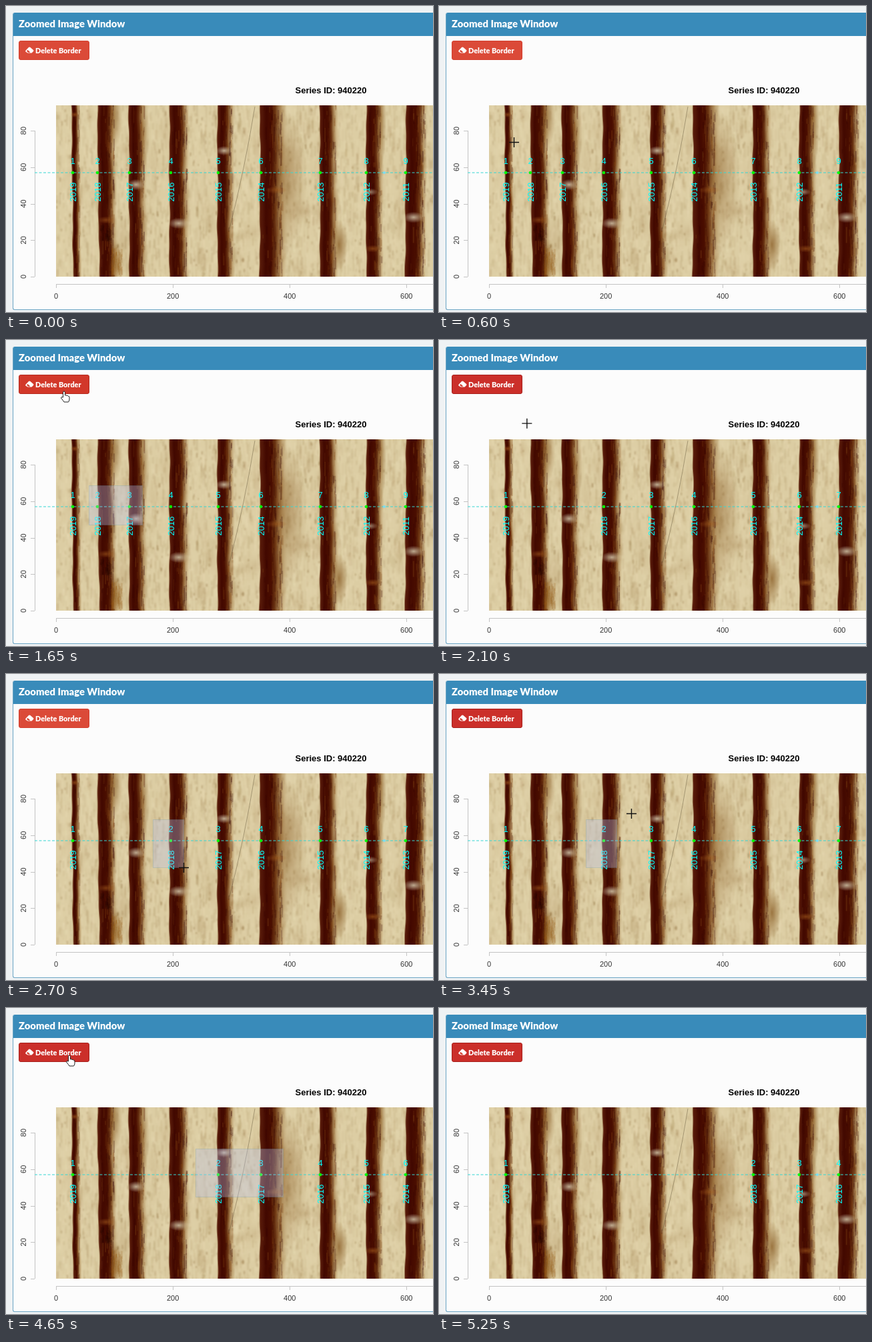
Animation, 640 px wide and 459 px high, one loop 5.4 s. Source, as an HTML page with a canvas:

```html
<!DOCTYPE html>
<html lang="en">
<head>
<meta charset="utf-8">
<title>Zoomed Image Window</title>
<style>
  html, body { margin: 0; width: 100%; height: 100%; overflow: hidden; background: #eff2f4; }
  .box, canvas, svg { position: absolute; }
  .box {
    left: 10px; top: 10px; width: 630px; height: 446px; box-sizing: border-box;
    border: solid #6ba5c4; border-width: 0 0 1px 1px; border-radius: 3px 0 0 3px;
    background: #fcfcfc; overflow: hidden;
    font-family: Lato, "Open Sans", sans-serif; font-weight: 900; color: #fff;
  }
  .head {
    position: absolute; left: -1px; top: 0; width: 630px; height: 35px;
    background: #398bba; font-size: 14.8px; line-height: 32px; text-indent: 9px;
  }
  .btn {
    position: absolute; left: 8px; top: 42px; width: 106px; height: 29px; box-sizing: border-box;
    border: 1px solid #d43f2e; border-radius: 3px; background: #db4a38;
    font-size: 10.8px; line-height: 27px; text-indent: 24px; white-space: nowrap;
  }
  .btn.hover { background: #d2382a; border-color: #b52a1e; }
  .btn.focus { background: #cb2f2a; border-color: #a8201c; }
  canvas { left: 75px; top: 149px; }
  svg { left: 0; top: 0; font-family: "Liberation Sans", Arial, sans-serif; }
  .mid { text-anchor: middle; }
</style>
</head>
<body>
<div class="box">
  <div class="head">Zoomed Image Window</div>
  <div class="btn" id="btn">Delete Border</div>
</div>
<canvas id="wood" width="565" height="257"></canvas>
<svg width="640" height="459" viewBox="0 0 640 459">
  <path d="M29.3 67 L34 62 Q35.2 61 36.4 62 L41 66 Q42 67 41 68 L38.5 70.6 H32.5 L29.3 68.4 Z" fill="#fff"/>
  <path d="M31 67.6 L32.6 66 L36.2 69.2 L35.6 69.7 H33 Z" fill="#d4402f"/>
  <text class="mid" x="487" y="131" font-size="13" font-weight="700">Series ID: 940220</text>
  <g id="axes" font-size="11" fill="#333"></g>
  <path d="M43 250H640" stroke="#35d6d2" stroke-dasharray="4 2.5"/>
  <circle cx="567" cy="250" r="2" fill="#7fdcf0"/>
  <g id="marks" font-size="13" fill="#0ff"></g>
  <rect id="brush" fill="#b8c2ee" stroke="#7aa4c4" opacity=".34"/>
  <path id="cross" d="M-7 .5H8M.5 -7V8" stroke="#111" stroke-width="1.4"/>
  <path id="hand" fill="#fff" stroke="#222" stroke-linejoin="round"
    d="M-1.5 8V0.5Q-1.5-1 0-1T1.5 .5V5Q3 4 4 5.5Q5.6 4.8 6.3 6.3Q8 6 8 8V11Q8 13 6.5 15H0Q-1.5 12.5-4.5 9Q-4.5 6.5-1.5 8Z"/>
</svg>
<script>
const $ = id => document.getElementById(id);
const STEP = 150, STEPS = 36;

function add(parent, tag, attrs, text = '') {
  const el = document.createElementNS('http://www.w3.org/2000/svg', tag);
  for (const key in attrs) el.setAttribute(key, attrs[key]);
  el.textContent = text;
  return parent.appendChild(el);
}

// Wood scan
function paintWood() {
  const wood = $('wood'), ctx = wood.getContext('2d'), W = wood.width, H = wood.height;
  let seed = 29;
  const rnd = () => (seed = (seed * 16807) % 2147483647) / 2147483647;
  const span = (a, b) => a + rnd() * (b - a);
  const streak = (x, y, w, h, rgb, alpha) => {
    ctx.fillStyle = `rgba(${rgb},${alpha})`;
    ctx.fillRect(x, y, w, h);
  };
  const blotch = (x, y, rx, ry, rgb, alpha) => {
    const g = ctx.createRadialGradient(0, 0, 0, 0, 0, 1);
    g.addColorStop(0, `rgba(${rgb},${alpha})`);
    g.addColorStop(1, `rgba(${rgb},0)`);
    ctx.save();
    ctx.translate(x, y);
    ctx.scale(rx, ry);
    ctx.fillStyle = g;
    ctx.fillRect(-1, -1, 2, 2);
    ctx.restore();
  };

  ctx.fillStyle = '#dccda3';
  ctx.fillRect(0, 0, W, H);
  for (let i = 0; i < 150; i++)
    blotch(rnd() * W, rnd() * H, span(6, 18), span(10, 40),
      rnd() < .5 ? '238,226,190' : '165,130,80', span(.08, .24));
  for (let i = 0; i < 5200; i++)
    streak(rnd() * W, span(-20, H), span(1, 3.2), span(4, 20),
      rnd() < .55 ? '240,228,192' : '152,122,72', span(.06, .2));
  for (let i = 0; i < 330; i++)
    streak(rnd() * W, rnd() * H, span(1, 2.4), span(2, 7), '125,90,40', span(.2, .45));
  ctx.filter = 'blur(.8px)';
  ctx.drawImage(wood, 0, 0);
  ctx.filter = 'none';

  // stained patches beside the bands
  [[342, 115, 34, 110, .5], [424, 209, 13, 38, .75], [85, 18, 14, 50, .75],
   [88, 236, 14, 36, .6], [486, 25, 9, 70, .7], [130, 40, 10, 60, .5]]
    .forEach(([x, y, rx, ry, alpha]) => blotch(x, y, rx, ry, '134,88,32', alpha));

  // left edge, dark width, soft width, lean towards the bottom
  const bands = [
    [23, 8, 4, 3], [62, 19, 8, 3], [109, 17, 9, 1], [170, 20, 9, 0], [242, 16, 9, 0],
    [306, 24, 16, -1], [395, 18, 9, 1], [465, 17, 8, 0], [525, 22, 9, -2]
  ];
  bands.forEach(([x, dark, soft, lean], k) => {
    const w = dark + soft + 2;
    const g = ctx.createLinearGradient(0, 0, w, 0);
    [[0, '98,48,14,0'], [2 / w, '82,18,2,.95'], [.25, '66,8,0,1'], [dark * .75 / w, '74,14,0,1'],
     [dark / w, '98,42,10,.95'], [(dark + soft / 2) / w, '142,94,42,.6'], [1, '190,156,100,0']]
      .forEach(([at, c]) => g.addColorStop(at, `rgba(${c})`));
    ctx.fillStyle = g;
    for (let y = 0; y < H; y++) {
      const wave = Math.sin(y / 19 + k * 2) * .6 + Math.sin(y / 7 + k) * .35;
      ctx.setTransform(1, 0, 0, 1, x - 1 + lean * y / H + wave, y);
      ctx.fillRect(0, 0, w, 1);
    }
    ctx.setTransform(1, 0, 0, 1, 0, 0);
    for (let i = 0; i < dark * 7; i++) {
      const at = Math.sqrt(rnd());
      streak(x + 2 + at * (dark + soft * .4), span(-8, H), span(1, 2.4), span(5, 24),
        rnd() < .45 ? '132,72,22' : '52,4,0', span(.1, .32));
    }
  });

  // crossing marks: centre, width, height, colour, strength
  const pale = '218,208,178', rust = '165,92,28';
  [[120, 119, 21, 12, pale, .8], [184, 177, 25, 12, pale, .8], [252, 68, 20, 10, pale, .8],
   [470, 130, 20, 8, pale, .6], [536, 168, 25, 12, pale, .8], [28, 14, 10, 6, rust, .6],
   [75, 172, 21, 8, rust, .55], [330, 127, 27, 8, rust, .5], [475, 215, 20, 8, rust, .6]
  ].forEach(([x, y, w, h, rgb, strength]) => blotch(x, y, w * .62, h * .7, rgb, strength));

  for (let i = 0; i < 110; i++) {
    streak(span(82, 99), span(212, 246), span(1, 2), span(5, 18), '152,94,24', span(.08, .2));
    if (i < 40) streak(span(66, 82), span(176, 200), 2, span(4, 12), '35,5,0', .2);
  }
  ctx.strokeStyle = 'rgba(95,82,55,.45)';
  ctx.beginPath();
  ctx.moveTo(298, 2);
  ctx.quadraticCurveTo(283, 95, 260, 185);
  ctx.stroke();
}

// Axes
function buildAxes() {
  const axes = $('axes'), px = v => 75 + v * .8755, py = v => 406 - v * 2.7375;
  let d = 'M43.5 187V406M75 417.5H640';
  for (let v = 0; v <= 80; v += 20) {
    const y = py(v);
    d += `M43 ${Math.round(y) + .5}h-6`;
    add(axes, 'text', { class: 'mid', transform: `translate(29.5 ${y}) rotate(-90)` }, v);
  }
  for (let v = 0; v <= 600; v += 200) {
    const x = px(v);
    d += `M${Math.round(x) + .5} 417v6`;
    add(axes, 'text', { class: 'mid', x, y: 439 }, v);
  }
  add(axes, 'path', { d, stroke: '#c4c4c4', fill: 'none' });
}

// Borders; gone = step at which each one is deleted
const borders = [[100], [137, 13], [185, 13], [247, 24], [318, 32], [382, 32], [471], [540], [599]]
  .map(([x, gone = STEPS]) => {
    const g = add($('marks'), 'g', {});
    add(g, 'circle', { cx: x, cy: 250, r: 2.3, fill: '#0f0' });
    return {
      g, gone,
      num: add(g, 'text', { class: 'mid', x, y: 237 }),
      year: add(g, 'text', { class: 'mid', transform: `translate(${x + 5} 279) rotate(-90)` })
    };
  });

// Pointer path: step, x, y
const path = [
  [3, 100, 190], [5, 124, 218], [7, 184, 262], [8, 204, 277], [9, 204, 277], [11, 87, 78],
  [13, 87, 78], [16, 220, 218], [18, 266, 290], [19, 266, 290], [21, 88, 72], [22, 88, 72],
  [23, 288, 209], [25, 284, 211], [27, 415, 283], [28, 243, 146], [29, 95, 72], [31, 95, 72]
];
// Drags: start, end, step of deletion, click
const drags = [
  { from: 5, to: 8, gone: 13, click: 12 },
  { from: 16, to: 18, gone: 24, click: 21 },
  { from: 25, to: 27, gone: 32, click: 30 }
];

function pointer(n) {
  const i = path.findIndex(p => p[0] >= n);
  if (i < 0 || n < path[0][0]) return null;
  const b = path[i], a = path[Math.max(i - 1, 0)];
  const k = b[0] === a[0] ? 1 : (n - a[0]) / (b[0] - a[0]);
  return [a[1] + (b[1] - a[1]) * k, a[2] + (b[2] - a[2]) * k];
}

const show = (el, on) => el.setAttribute('visibility', on ? 'visible' : 'hidden');

function place(el, p, on) {
  show(el, on);
  if (on) el.setAttribute('transform', `translate(${p[0]} ${p[1]})`);
}

function draw(n) {
  let count = 0;
  for (const b of borders) {
    const on = n < b.gone;
    show(b.g, on);
    if (!on) continue;
    b.num.textContent = ++count;
    b.year.textContent = 2020 - count;
  }

  const drag = drags.find(d => n > d.from && n < d.gone);
  show($('brush'), drag);
  if (drag) {
    const [x, y] = pointer(drag.from), [x2, y2] = pointer(Math.min(n, drag.to));
    Object.entries({ x: x + .5, y: y + .5, width: x2 - x, height: y2 - y })
      .forEach(([key, v]) => $('brush').setAttribute(key, v));
  }

  const p = pointer(n), over = p && p[1] < 100;
  place($('cross'), p, p && !over);
  place($('hand'), p, over);
  const focused = drags.some((d, i) => n >= d.click && n < (drags[i + 1]?.from ?? STEPS));
  $('btn').className = 'btn' + (focused ? ' focus' : over ? ' hover' : '');
}

paintWood();
buildAxes();
let last = -1;
const start = performance.now();
function tick() {
  const n = Math.floor((performance.now() - start) / STEP) % STEPS;
  if (n !== last) draw(last = n);
  requestAnimationFrame(tick);
}
tick();
</script>
</body>
</html>
```
